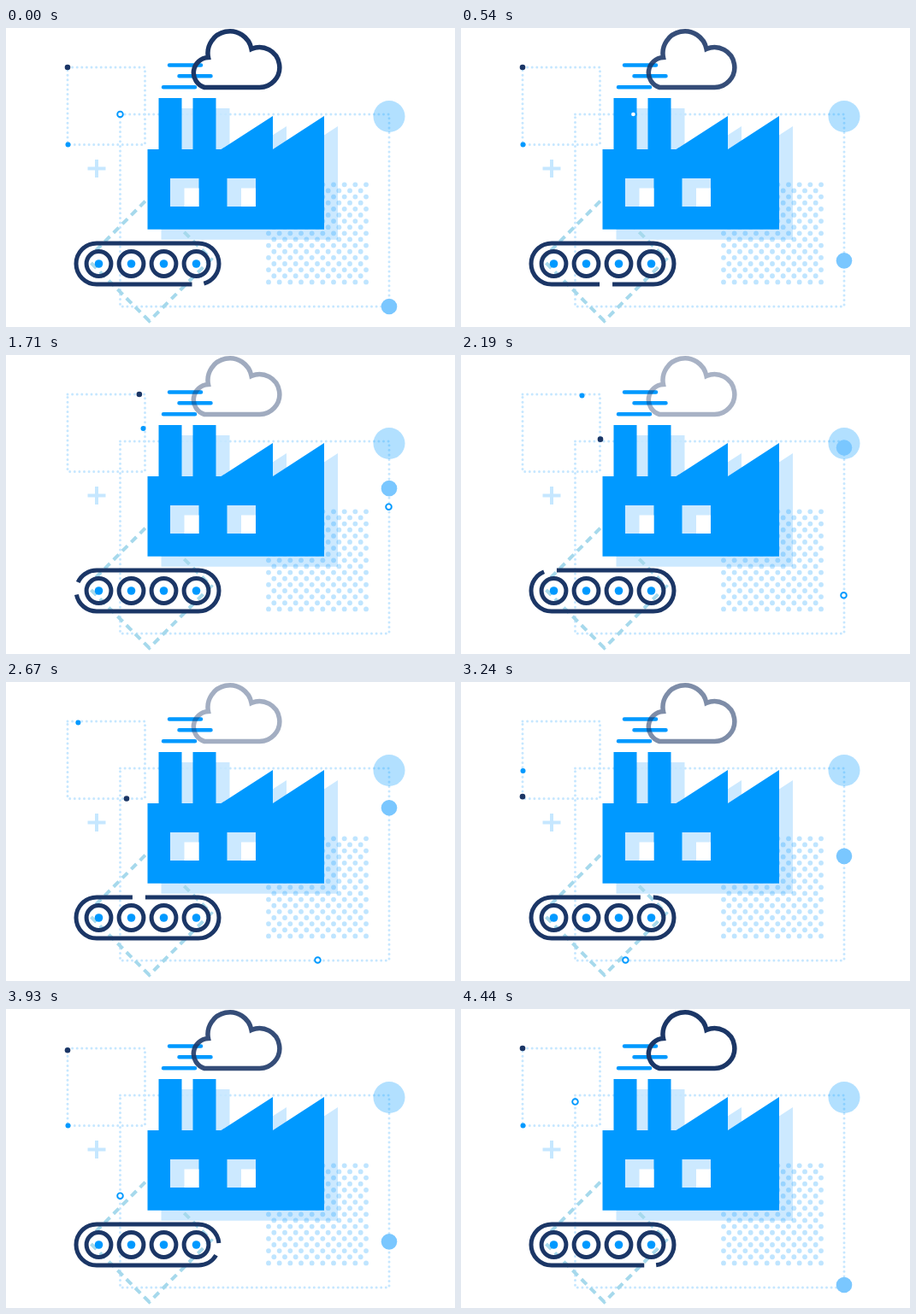
Recreate the animation shown at these times as an HTML page. Size 525x350 px, loop 4470 ms.

```html
<!DOCTYPE html>
<html lang="en">
<head>
<meta charset="utf-8">
<title>Factory</title>
<style>
  html, body { margin: 0; width: 100%; height: 100%; overflow: hidden; background: #fff; }
  svg { display: block; width: 100%; height: 100%; }
  .dotted { fill: none; stroke: #c6e7ff; stroke-width: 3; stroke-linecap: round; stroke-dasharray: 0 5.6; }
  .navy { fill: none; stroke: #1b3666; stroke-width: 5; }
</style>
</head>
<body>
<svg viewBox="0 0 525 350">
  <defs>
    <path id="building" d="M165.5 142H178.500V82H205.500V142H218.500V82H245.500V142H251.500L312 103V142L372 103V235.700H165.500Z"/>
    <g id="window">
      <path fill="#cce9ff" d="M192 176h33.500v33H192z"/>
      <path fill="#fff" d="M208.500 187.500h17V209h-17z"/>
    </g>
    <g id="wheel">
      <circle class="navy" cy="276" r="14.4"/>
      <circle cy="276" r="4.8" fill="#09f"/>
    </g>
  </defs>

  <use href="#building" x="16" y="12" fill="#cce9ff"/>
  <g id="halftone" fill="#09f" fill-opacity=".25"></g>
  <path class="dotted" d="M72 46H162.500V136.500H72Z"/>
  <path class="dotted" d="M133.500 101H448V326H133.500Z"/>
  <path d="M95.500 164.500h21M106 154v21" stroke="#c6e7ff" stroke-width="4"/>
  <path d="M167.500 343L95 270.500L167.500 198L240 270.500Z" fill="none" stroke="#a6d9ec" stroke-width="4" stroke-dasharray="8.6 6"/>

  <use href="#building" fill="#09f"/>
  <use href="#window"/>
  <use href="#window" x="66.5"/>

  <path d="M191 43.500h37M202.500 56.300h37M184 69.300h37" stroke="#09f" stroke-width="4.5" stroke-linecap="round"/>
  <path id="cloud" class="navy" style="stroke-width:5.5"
    d="M232 69.500A17.900 17.900 0 0 1 236.500 34.500A25.700 25.700 0 0 1 287 24.500A23.500 23.500 0 1 1 294.500 69.500Z"/>

  <path id="belt" class="navy" stroke-dasharray="373.8 15"
    d="M225 300H106A24 24 0 0 1 106 252H225A24 24 0 0 1 225 300Z"/>
  <use href="#wheel" x="108.5"/>
  <use href="#wheel" x="146.5"/>
  <use href="#wheel" x="184.5"/>
  <use href="#wheel" x="222.5"/>

  <circle cx="448" cy="103.5" r="18.5" fill="#09f" fill-opacity=".3"/>
  <circle id="weight" cx="448" r="9.3" fill="#7ac7ff"/>
  <circle id="blueDot" r="3" fill="#09f"/>
  <circle id="navyDot" r="3.3" fill="#1b3666"/>
  <circle id="ring" r="3.3" fill="#fff" stroke="#09f" stroke-width="1.9"/>
</svg>
<script>
const LOOP = 4470, STEP = 30;
const BELT_SIDE = 119, BELT_ARC = Math.PI * 24, GAP = 15;
const el = id => document.getElementById(id);
const set = (id, attrs) => Object.entries(attrs).forEach(([k, v]) => el(id).setAttribute(k, v));

// One lap around a polygon: waits until start, then takes the same time for every side.
function lap(corners, t, start, sideTime) {
  const p = Math.min(Math.max((t - start) / sideTime, 0), 4);
  const side = Math.floor(p), k = p - side;
  const [x0, y0] = corners[side % 4], [x1, y1] = corners[(side + 1) % 4];
  return { cx: x0 + (x1 - x0) * k, cy: y0 + (y1 - y0) * k };
}

// Distance of the gap along the belt: straights and arcs take the same time.
function beltDistance(t) {
  const p = Math.max(t - 30, 0) / 1095, part = Math.floor(p);
  return Math.ceil(part / 2) * BELT_SIDE + Math.floor(part / 2) * BELT_ARC
    + (p - part) * (part % 2 ? BELT_ARC : BELT_SIDE);
}

const clockwise = (l, t, r, b) => [[l, t], [r, t], [r, b], [l, b]];
const bigFrame = clockwise(133.5, 101, 447.5, 325.5);
const smallFrame = clockwise(72, 46, 163, 136.5);
const blueFrame = clockwise(72.5, 47.5, 160.5, 136.5).reverse();

for (let row = 0; row <= 16; row++) {
  const shift = row % 2 / 2;
  for (let col = shift; col <= 9 - shift; col++) {
    const x = 307 + col * 12.67, y = 183.3 + row * 7.13;
    el('halftone').insertAdjacentHTML('beforeend', `<circle cx="${x}" cy="${y}" r="2.9"/>`);
  }
}

function draw() {
  const t = Math.floor(performance.now() % LOOP / STEP) * STEP;
  const wave = (1 + Math.cos(2 * Math.PI * t / LOOP)) / 2;
  set('weight', { cy: 104 + 222 * Math.abs(1 - 2 * t / LOOP) });
  set('ring', lap(bigFrame, t, 315, 1040));
  set('navyDot', lap(smallFrame, t, 1040, 727));
  set('blueDot', lap(blueFrame, t, 550, 740));
  set('belt', { 'stroke-dashoffset': -beltDistance(t) - GAP / 2 });
  set('cloud', { opacity: .38 + .62 * wave ** 1.4 });
  requestAnimationFrame(draw);
}
draw();
</script>
</body>
</html>
```
